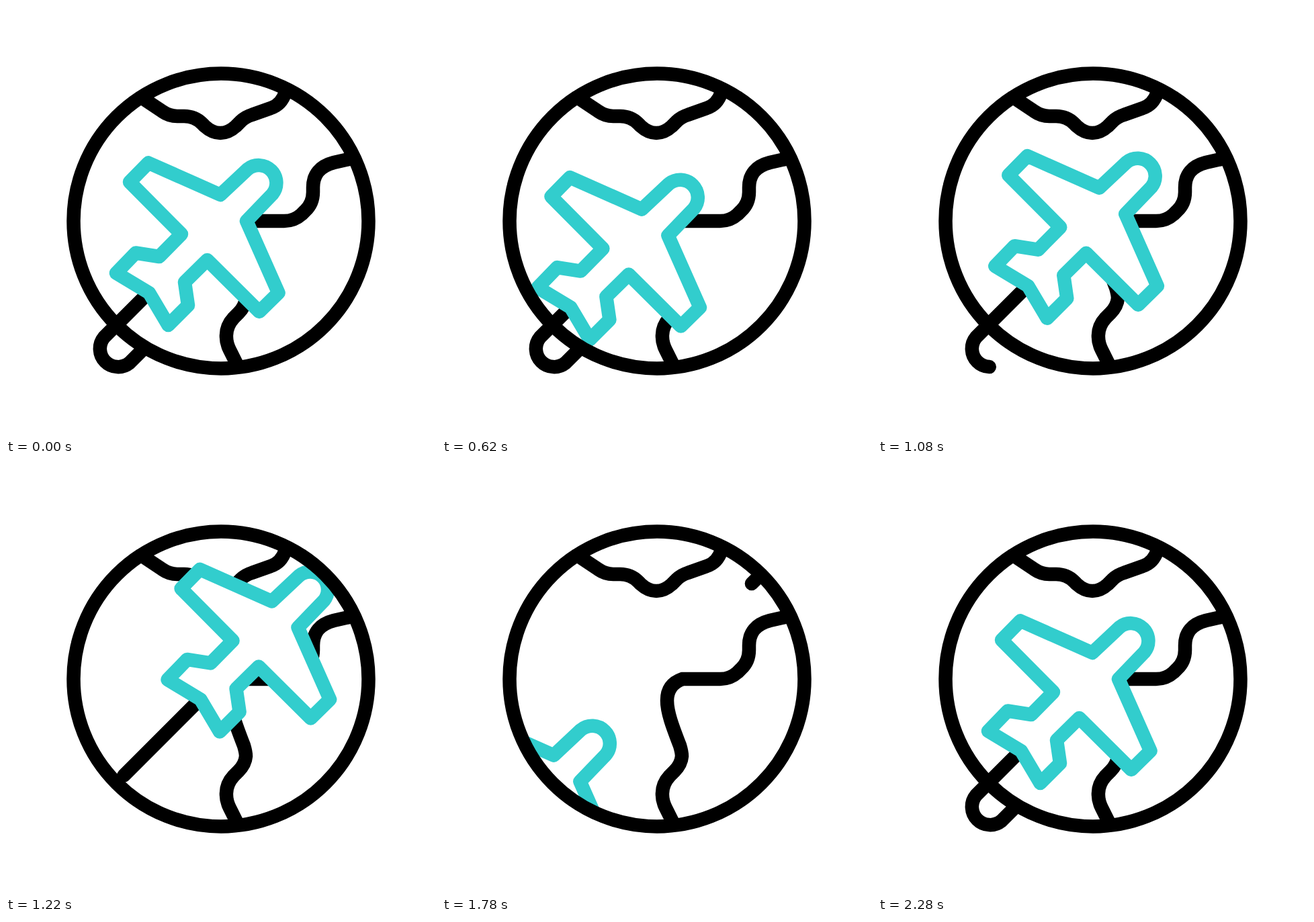
Recreate the animation shown at these times as an HTML page. Size 640 by 640 pixels, loop 2400 ms.

```html
<!DOCTYPE html>
<html lang="en">
<head>
<meta charset="utf-8">
<title>Plane around the globe</title>
<style>
  html, body { margin: 0; width: 100%; height: 100%; overflow: hidden; background: #fff; }
  svg { display: block; width: 100%; height: 100%; }
  .ink { fill: none; stroke: #000; stroke-width: 20.5; }
  .trail { stroke-linecap: round; }
  .plane { fill: #fff; stroke: #32cdcd; stroke-width: 20.5; stroke-linejoin: round; }
</style>
</head>
<body>
<svg viewBox="0 0 640 640">
  <defs>
    <clipPath id="disc"><circle cx="320" cy="320" r="226"/></clipPath>
    <path id="orbit" d="M206 509L184 531A27 27 0 0 1 146 493L470 169"/>
    <path id="jet" d="M359.5 243A26.3 26.3 0 0 1 396.5 280L358 320 405.5 427 377 455 299.5 378 266 411 271 445.500 241.500 475 213 427 164 397.500 193 367.500 228 373 261 339.500 184 262 212 233.500 319 281Z"/>
  </defs>
  <g class="ink">
    <path d="M203 137L233 157Q243 164 255 164H265Q281 164 292 175L296 179Q307 189 319 189T342 179L349 172Q356 165 366 162L394 152Q410 147 416 128"/>
    <path d="M515 227L488 233Q457 241 457 270V277Q457 294 445 305L440 310Q429 320 414 320H358Q335 328 335 352C335 372 346 398 354 419Q357 429 357 435Q356 447 346 457L339 464Q327 477 328 493Q328 502 333 512L343 532"/>
    <use href="#orbit" class="trail"/>
    <use href="#orbit" class="trail"/>
  </g>
  <g clip-path="url(#disc)">
    <use href="#jet" class="plane"/>
    <use href="#jet" class="plane"/>
  </g>
  <circle class="ink" cx="320" cy="320" r="219.5"/>
</svg>
<script>
const LOOP = 2400;
const trails = document.querySelectorAll('.trail');
const planes = document.querySelectorAll('.plane');
const orbitLength = document.getElementById('orbit').getTotalLength();

const clamp = (v, lo, hi) => Math.min(hi, Math.max(lo, v));
const ease = v => { v = clamp(v, 0, 1); return v * v * (3 - 2 * v); };

// Distance along the orbit for an x on its straight front strand
const along = x => clamp(143 + (x - 165) * Math.SQRT2, 0, orbitLength);

function place(i, shift, tail) {
  planes[i].setAttribute('transform', `translate(${shift} ${-shift})`);
  const from = along(tail), length = along(212 + shift) - from;
  trails[i].style.display = length > 0 ? '' : 'none';
  trails[i].style.strokeDasharray = `0 ${from} ${length} 2000`;
  // Skip the zero-length first dash so that it leaves no round dot
  trails[i].style.strokeDasharray = `${length} 2000`;
  trails[i].style.strokeDashoffset = -from;
}

function draw(t) {
  // Backs up slowly, then flies out at the top right
  const leaving = -28 * ease(t / 900) + 314 * ease((t - 900) / 830);
  place(0, t < 2000 ? leaving : 1000, 293 + (t - 1460) * 0.51);
  // Comes round from behind the globe
  const rest = Math.max(0, 2280 - t) / 500;
  place(1, t > 1500 ? -153 * rest ** 1.35 : -1000, -1000);
}

function tick() {
  draw(performance.now() % LOOP);
  requestAnimationFrame(tick);
}
tick();
</script>
</body>
</html>
```
